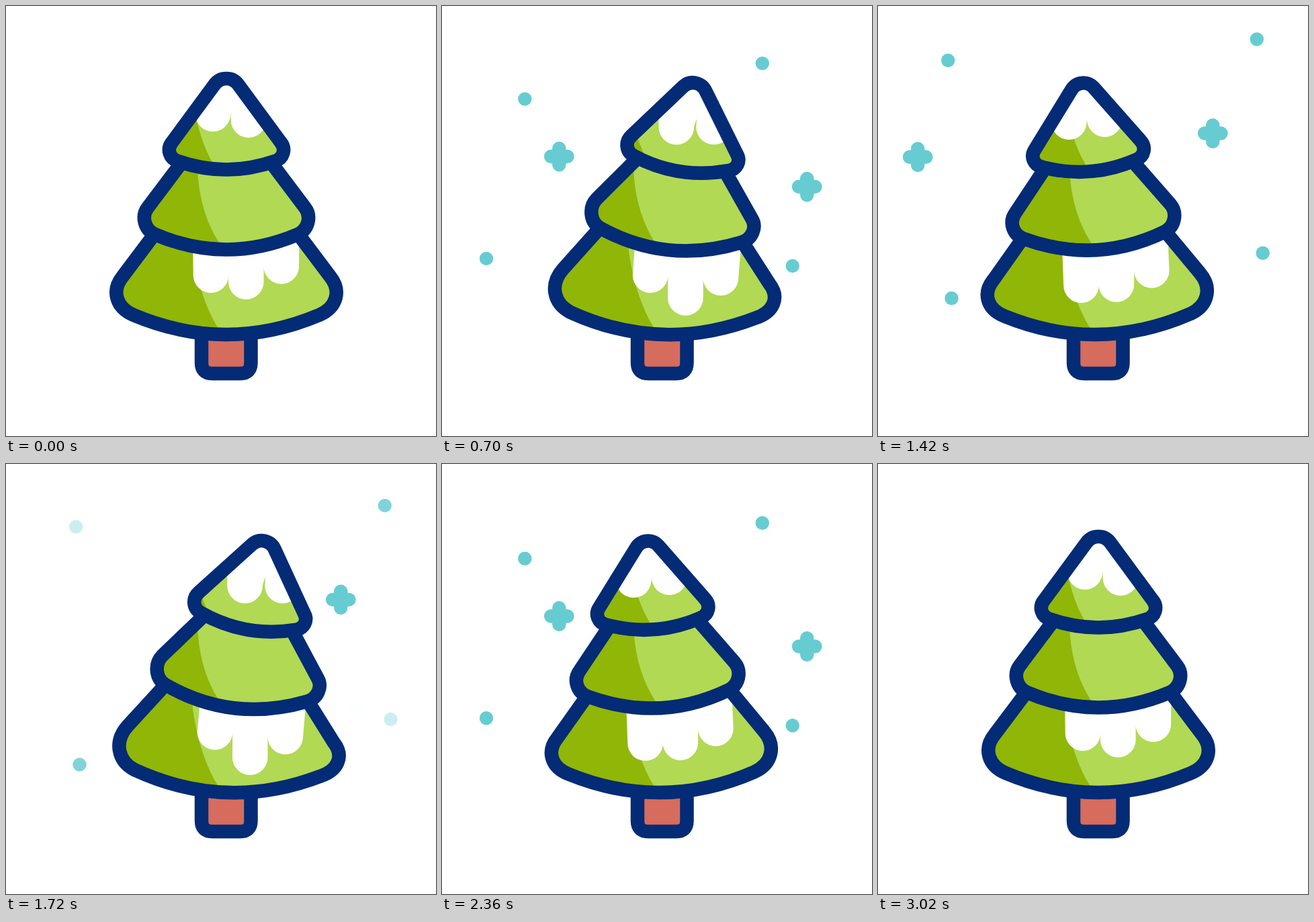
Animation, 640 px wide and 640 px high, one loop 3.1 s. Source, as an HTML page:

```html
<!DOCTYPE html>
<html lang="en">
<head>
<meta charset="utf-8">
<title>Swaying tree</title>
<style>
  html, body { margin: 0; width: 100%; height: 100%; overflow: hidden; background: #fff; }
  svg { display: block; width: 100vw; height: 100vh; }
  .line { fill: none; stroke: #042b75; stroke-width: 20.5; stroke-linejoin: round; }
  .dark { fill: #90b608; }
  .light { fill: #b1d953; }
  .snow { fill: #fff; }
  .flake { fill: #66ccd2; stroke: #66ccd2; stroke-width: 20.4; stroke-linecap: round; }
</style>
</head>
<body>
<svg viewBox="0 0 640 640">
  <defs id="defs"></defs>
  <g id="flakes"></g>
  <path d="M291,470 V531 Q291,547 307,547 H348.5 Q364.5,547 364.5,531 V470 Z" fill="#d66c5d" stroke="#042b75" stroke-width="20.5"/>
  <g id="tree"></g>
</svg>
<script>
const LOOP = 3100;
const $ = id => document.getElementById(id);

function add(parent, tag, attrs) {
  const el = document.createElementNS('http://www.w3.org/2000/svg', tag);
  for (const key in attrs) el.setAttribute(key, attrs[key]);
  return parent.appendChild(el);
}

// Tiers from bottom to top; the light side stays fixed while the outline bends.
const tiers = [
  {
    outline: 'M250,301 L174,402 C156,424 164,449 190,460 Q328,518 466,460 C492,449 500,424 482,402 L406,301 Z',
    light: 'M276,300 L278,365 Q288,435 316,480 L335,520 H640 V300 Z',
    snow: lowSnow
  },
  {
    outline: 'M290,195 L211,300 C201,313 206,333 222,340 Q328,385 434,340 C450,333 455,313 445,300 L366,195 Z',
    light: 'M285,180 V240 Q287,305 317,352 L335,390 H640 V180 Z'
  },
  {
    outline: 'M310.3,117 L247,203 C239,213 243,227 256,231 Q328,256 400,231 C413,227 417,213 409,203 L345.7,117 C337,105 319,105 310.3,117 Z',
    light: 'M272,90 L280,150 Q288,200 308,234 L325,270 H640 V90 Z',
    snow: topSnow
  }
];

tiers.forEach((tier, i) => {
  const clip = add($('defs'), 'clipPath', { id: 'clip' + i });
  const body = add($('tree'), 'g', { 'clip-path': `url(#clip${i})` });
  add(body, 'rect', { width: 640, height: 640, class: 'dark' });
  add(body, 'path', { d: tier.light, class: 'light' });
  if (tier.snow) tier.cap = add(body, 'path', { class: 'snow' });
  tier.shapes = [add(clip, 'path', {}), add($('tree'), 'path', { class: 'line' })];
});

// kind, x, y, time at that y, start of the fade in, passes per loop
const flakes = [
  ['dot', 123.3, 126, 400, 120, 2],
  ['dot', 521.7, 374.5, 400, 120, 2],
  ['plus', 174.3, 211.7, 400, 180, 2],
  ['dot', 476.8, 73, 400, 240, 2],
  ['dot', 66, 363.5, 400, 240, 2],
  ['plus', 543.2, 256.7, 400, 300, 2],
  ['plus', 59.2, 224.7, 1420, 880, 1],
  ['dot', 104.2, 81, 1420, 940, 1],
  ['dot', 572.7, 367.7, 1420, 940, 1],
  ['dot', 563.8, 49.5, 1420, 1000, 1],
  ['dot', 109.5, 435, 1420, 1000, 1],
  ['plus', 498.3, 189.5, 1420, 1060, 1]
].map(([kind, x, y, at, start, passes]) => ({
  x, y, at, start, passes,
  el: add($('flakes'), 'path', {
    class: 'flake',
    d: kind === 'dot' ? 'M0,0 h.01' : 'M-12.2,0 H12.2 M0,-12.2 V12.2'
  })
}));

const clamp = v => Math.min(1, Math.max(0, v));
const ease = v => v * v * (3 - 2 * v);

// Eased value along [time, value] keys
function along(keys, t) {
  const i = keys.findIndex(k => k[0] > t);
  if (i < 0) return keys[keys.length - 1][1];
  const [t0, v0] = keys[i - 1], [t1, v1] = keys[i];
  return v0 + (v1 - v0) * ease((t - t0) / (t1 - t0));
}

const leanKeys = [[0, 0], [650, 54], [1210, -66], [1770, 62], [2517, -35], [3020, 0]];
const droopKeys = [[0, 0], [735, 1], [2500, 1], [3020, 0]];

// Sideways bend that grows with height, plus a slight sag
function bend(path, lean, droop) {
  return path.replace(/([\d.]+),([\d.]+)/g, (_, px, py) => {
    const y = +py, off = px - 328;
    const u = Math.max(0, 490 - y) / 390;
    const nx = 328 + off * (1 - 0.058 * droop * u * u) + lean * u ** 1.5;
    const ny = y + off * lean * 0.0041 * u ** 0.75 + 7 * droop * u * u;
    return nx.toFixed(2) + ',' + ny.toFixed(2);
  });
}

const lobe = (x, y) => `A26.3,26.3 0 0 0 ${x + 26.3},${y}`;

function topSnow(lean, droop) {
  const dx = lean * 0.88 - 1.5 * droop;
  const lx = 308 + dx * 0.96 - droop, rx = 361 + dx;
  const ly = 160.7 + 14.5 * droop + 0.1 * lean;
  const ry = 169.7 + 2.7 * droop + 0.15 * lean;
  const cx = 334.6 + dx + droop, cy = 162 + 4 * droop + 0.04 * lean;
  return `M${lx - 26.3},60 V${ly} ${lobe(lx, ly)} Q${lx + 27},${ly - 4} ${cx},${cy} L${rx - 26.3},${ry} ${lobe(rx, ry)} L${rx + 60},60 Z`;
}

function lowSnow(lean, droop) {
  const dx = lean * 0.1, top = lean * 0.16;
  const a = 305 + dx, b = 357.3 + dx, c = 409.8 + dx;
  const ay = 400.7 + 10.1 * droop - 0.197 * lean;
  const by = 410.5 + 10.6 * droop + 0.262 * lean;
  const cy = 387.5 + 9.7 * droop + 0.148 * lean;
  const c1 = 402 + 7.3 * droop - 0.23 * lean;
  const c2 = 387 + 6.3 * droop + 0.13 * lean;
  return `M${278.3 + top},340 V365 L${a - 26.3},${ay} ${lobe(a, ay)} L${a + 26.3},${c1} L${b - 26.3},${by} ${lobe(b, by)}
    L${b + 26.3},${c2} L${c - 26.3},${cy} ${lobe(c, cy)} L${436.2 + top},365 V340 Z`;
}

function draw(t) {
  const lean = along(leanKeys, t), droop = along(droopKeys, t);
  for (const tier of tiers) {
    const d = bend(tier.outline, lean, droop);
    tier.shapes.forEach(s => s.setAttribute('d', d));
    if (tier.cap) tier.cap.setAttribute('d', tier.snow(lean, droop));
  }
  for (const f of flakes) {
    const shift = f.passes > 1 && t > 1600 ? 1600 : 0;
    const now = t - shift, age = now - f.start;
    const alpha = Math.min(clamp(age / 120), clamp((820 - age) / 120));
    f.el.setAttribute('transform', `translate(${f.x} ${f.y + (now - f.at) * 0.041})`);
    f.el.setAttribute('opacity', alpha);
  }
}

const begin = performance.now();
function tick() {
  draw((performance.now() - begin) % LOOP);
  requestAnimationFrame(tick);
}
tick();
</script>
</body>
</html>
```
